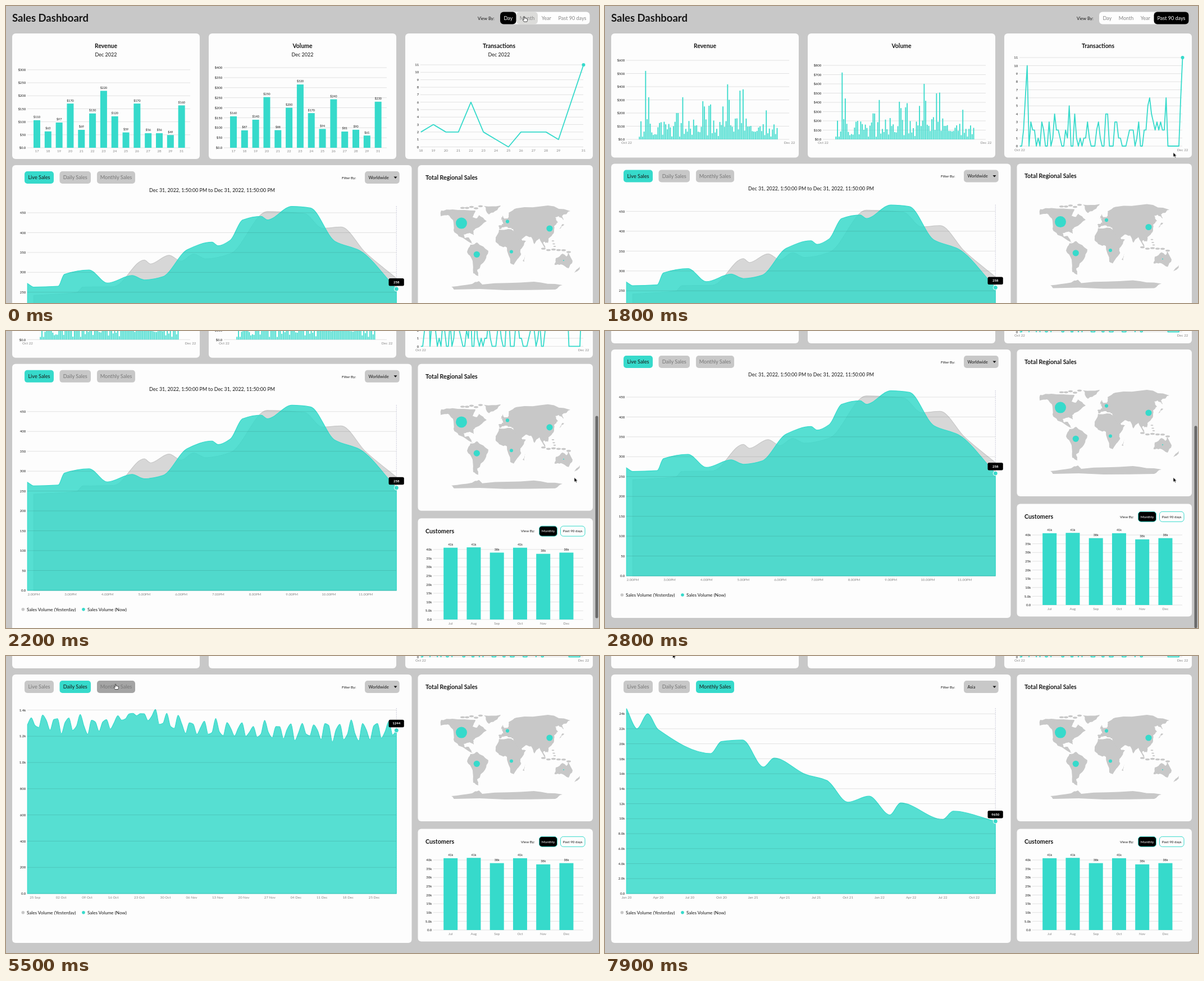
An HTML page that plays this animation: 1056x530 px, repeating every 8000 ms.

```html
<!DOCTYPE html>
<html lang="en">
<head>
<meta charset="utf-8">
<title>Sales Dashboard</title>
<style>
  html, body { margin: 0; width: 100%; height: 100%; overflow: hidden; background: #c8c8c8; }
  svg { display: block; width: 1056px; height: 530px; font-family: Lato, "Open Sans", sans-serif; }
  .menu text { font-family: Inter, Roboto, sans-serif; }
</style>
</head>
<body>
<svg id="stage" viewBox="0 0 1056 530"></svg>
<script>
const TEAL = '#36dacb', GRAY = '#c8c8c8', WHITE = '#fdfdfd', INK = '#161616', MUTED = '#858585';
const LOOP = 8000;
const stage = document.getElementById('stage');

// ---------- helpers (y of a text is its middle) ----------
const text = (x, y, str, size, { fill = INK, anchor = 'middle', bold = false, id = '' } = {}) =>
  `<text x="${x}" y="${y + size * 0.36}" font-size="${size}" fill="${fill}" text-anchor="${anchor}"` +
  `${bold ? ' font-weight="700"' : ''}${id && ` id="${id}"`}>${str}</text>`;
const rect = (x, y, w, h, r, fill, extra = '') =>
  `<rect x="${x}" y="${y}" width="${w}" height="${h}" rx="${r}" fill="${fill}" ${extra}/>`;
const dot = (x, y, r, fill = TEAL, extra = '') => `<circle cx="${x}" cy="${y}" r="${r}" fill="${fill}" ${extra}/>`;
const group = (id, body, extra = '') => `<g id="${id}" ${extra}>${body}</g>`;
const card = (x, y, w, h) => rect(x, y, w, h, 6, WHITE);
const range = (n, f) => Array.from({ length: n }, (_, i) => f(i));
const seeded = seed => () => (seed = seed * 16807 % 2147483647) / 2147483647;

// Linear interpolation through [position, ...values] keys
function at(keys, t) {
  const i = keys.findIndex(k => k[0] > t);
  if (i < 0) return keys[keys.length - 1].slice(1);
  if (!i) return keys[0].slice(1);
  const a = keys[i - 1], b = keys[i], p = (t - a[0]) / (b[0] - a[0]);
  return a.slice(1).map((v, n) => v + (b[n + 1] - v) * p);
}

// ---------- chart parts ----------
const short = v => !v ? '0.0' : v < 1000 ? String(+v.toPrecision(2))
  : v < 9950 ? (v / 1000).toFixed(1) + 'k' : Math.round(v / 1000) + 'k';
const money = v => '$' + short(v);

function grid(x1, x2, y0, scale, step, max, format = short) {
  let out = '';
  for (let v = 0; v <= max; v += step) {
    const y = y0 - v * scale;
    out += `<path d="M${x1} ${y}H${x2}" stroke="#001" stroke-opacity=".11"/>` +
      text(x1 - 2.7, y, format(v), 6, { anchor: 'end' });
  }
  return out;
}

const bars = (values, x, pitch, width, y0, scale, format) => values.map((v, i) => {
  const cx = x + i * pitch, top = y0 - v * scale;
  return rect(cx - width / 2, top, width, v * scale, 0, TEAL) +
    (format ? text(cx, top - 5.5, format(v), 5.3) : '');
}).join('');

const xLabels = (labels, x, pitch, y) =>
  labels.map((s, i) => text(x + i * pitch, y, s, 6.2, { fill: MUTED })).join('');

function line(points, y0, scale, step) {
  const pts = points.map(([i, v]) => [38.8 + i * step, y0 - v * scale]);
  return `<path d="M${pts.join('L')}" fill="none" stroke="${TEAL}" stroke-width="1.8" stroke-linejoin="round"/>` +
    dot(...pts[pts.length - 1], 3);
}
const indexed = values => values.map((v, i) => [i, v]);

// Monotone cubic through the points, flat at every peak and valley
function curve(points) {
  const n = points.length;
  const slope = range(n - 1, i => (points[i + 1][1] - points[i][1]) / (points[i + 1][0] - points[i][0]));
  const tangent = range(n, i => {
    const a = slope[i - 1], b = slope[i];
    if (a === undefined) return b;
    if (b === undefined) return a;
    return a * b > 0 ? 2 * a * b / (a + b) : 0;
  });
  let d = 'M' + points[0];
  for (let i = 1; i < n; i++) {
    const [x0, y0] = points[i - 1], [x1, y1] = points[i], h = (x1 - x0) / 3;
    d += `C${x0 + h} ${y0 + h * tangent[i - 1]} ${x1 - h} ${y1 - h * tangent[i]} ${x1} ${y1}`;
  }
  return d;
}

function area(points, x1, y0, scale, fill = TEAL, opacity = 0.83) {
  const step = (695.2 - x1) / points[points.length - 1][0];
  const d = curve(points.map(([i, v]) => [x1 + i * step, y0 - v * scale])) + `V${y0}H${x1}Z`;
  return `<path d="${d}" fill="${fill}" fill-opacity="${opacity}" stroke="${fill}" stroke-width="1.2"/>`;
}

// ---------- top row ----------
const titles = ['Revenue', 'Volume', 'Transactions'];
const topRow = (id, height, subtitle, charts) => group(id, titles.map((name, i) => {
  const x = 11 + i * 350, mid = x + 167;
  return card(x, 49, 334, height) + text(mid, 71.5, name, 10.4, { bold: true }) +
    (subtitle ? text(mid, 87, subtitle, 9) : '') +
    `<g transform="translate(${i * 350} 0)">${charts[i]}</g>`;
}).join(''));

const days = [...range(13, i => 17 + i), 31];
const dayBars = (values, scale, max) => grid(38, 328, 253, scale, 50, max, money) +
  bars(values, 55, 19.82, 12, 253, scale, money) + xLabels(days, 55, 19.82, 259);
const dayTrades = [2, 3, 2, 2, 6, 2, 1, 0, 2, 2, 2, 1, 11];
const dayView = topRow('day', 224, 'Dec 2022', [
  dayBars([106, 63, 97, 170, 69, 132, 219, 121, 59, 170, 56, 56, 49, 163], 0.464, 300),
  dayBars([157, 87, 140, 253, 88, 200, 316, 173, 94, 242, 81, 90, 61, 230], 0.3575, 400),
  grid(38, 328, 251.5, 13.32, 1, 11, String) +
    line(dayTrades.map((v, i) => [days[i + 1] - 18, v]), 251.5, 13.32, 22.28) +
    days.slice(1).map(d => text(38.8 + 22.28 * (d - 18), 258, d, 6.2, { fill: MUTED })).join('')
]);

// Month and year: same layout, other totals
function periodView(id, labels, pitch, width, totals, step, max) {
  const first = 183 - pitch * (labels.length - 1) / 2, gap = 289.7 / (labels.length - 1);
  const chart = (factor, top) => grid(38, 328, 238, 141 / top, step, top, money) +
    bars(totals.map(v => v * factor), first, pitch, width, 238, 141 / top, money) + xLabels(labels, first, pitch, 244);
  const trades = max / 50;
  return topRow(id, 221.5, '', [chart(1, max), chart(1.42, max * 1.6),
    grid(38, 328, 250, 158 / trades, trades / 10, trades, short) +
      line(indexed(totals.map(v => v / 60)), 250, 158 / trades, gap) + xLabels(labels, 38.8, gap, 256.5)]);
}
const months = 'Jan Feb Mar Apr May Jun Jul Aug Sep Oct Nov Dec'.split(' ');
const monthRandom = seeded(12);
const monthView = periodView('month', months, 22.4, 14, months.map(() => 2600 + 1800 * monthRandom()), 1000, 5000);
const yearView = periodView('year', ['2020', '2021', '2022'], 97, 58, [72000, 56000, 41000], 10000, 80000);

// 90 days: quiet seeded noise with a few outstanding days
const revenuePeaks = { 4: 520, 6: 320, 24: 200, 25: 200, 28: 320, 41: 290, 42: 250, 45: 255, 46: 265, 54: 250,
  57: 418, 58: 300, 65: 370, 67: 380, 82: 220 };
const tradePeaks = { 3: 6, 4: 10, 19: 4, 27: 5, 30: 4, 47: 4, 48: 4, 70: 5, 71: 6, 72: 4, 80: 6, 88: 6, 89: 11 };
const noise = seeded(90);
const revenue = range(90, i => revenuePeaks[i] || (20 + 140 * noise()) * (i > 69 ? 0.75 : 1));
const volume = revenue.map(v => v * (1.32 + 0.22 * noise()));
const trades = range(90, i => tradePeaks[i] || (i > 67 && i < 80 ? 2 : 0) + Math.floor((i > 67 ? 2 : 4) * noise() ** 2));
const span = ['Oct 22', 'Dec 22'];
const quarterBars = (values, scale, max) => grid(38, 328, 238, scale, 100, max, money) +
  bars(values, 61.3, 2.755, 1.8, 238, scale) + xLabels(span, 38.5, 290, 244);
const quarterView = topRow('quarter', 221.5, '', [
  quarterBars(revenue, 0.235, 600),
  quarterBars(volume, 0.165, 800),
  grid(38, 328, 250, 14.36, 1, 11, String) + line(indexed(trades), 250, 14.36, 3.255) + xLabels(span, 38.5, 290, 256.5)
]);

// ---------- header ----------
const segments = [['Day', 880, 28.5], ['Month', 909, 38], ['Year', 947.5, 29.5], ['Past 90 days', 977.5, 62]];
const tabs = [['Live Sales', 33, 52], ['Daily Sales', 95.5, 55.5], ['Monthly Sales', 162, 68]];
const buttons = (list, kind, y, r, size) => list.map(([name, x, w], i) =>
  rect(x, y, w, 22, r, 'none', `id="${kind}${i}"`) + text(x + w / 2, y + 11, name, size, { id: `${kind}Text${i}` })).join('');
const header = text(11, 21, 'Sales Dashboard', 18.5, { bold: true, anchor: 'start' }) +
  text(840, 22, 'View By:', 7.7, { anchor: 'start' }) +
  rect(880, 10.5, 159.5, 22, 6, WHITE) + buttons(segments, 'seg', 10.5, 6, 9);

// ---------- sales panel: curves given by their turning points ----------
const liveNow = [[0, 272], [1, 263], [5, 265], [6, 295], [10, 306], [13, 273], [17, 292], [19, 281], [22, 289],
  [26, 357], [30, 376], [31, 367], [33, 381], [35, 432], [38, 441], [39, 432], [43, 466], [46, 462], [50, 378],
  [54, 355], [60, 258]];
const liveBefore = [[0, 242], [7, 249], [8, 263], [13, 264], [18, 331], [19, 321], [22, 343], [24, 328], [26, 346],
  [28, 334], [32, 347], [38, 453], [44, 448], [47, 411], [50, 414], [54, 349], [59, 285]];
const world = [[0, 101.4], [1, 87.4], [2, 94], [3, 84.8], [5, 75.6], [8, 75.3], [9, 83.6], [12, 80.5], [13, 70],
  [14, 76.5], [17, 62], [18, 62], [20, 54.7], [24, 48.2], [25, 43.3], [26, 46.2], [29, 41.2], [35, 38.3]];
const asia = [[0, 24.7], [1, 22], [2, 24], [3, 21.9], [8, 18.7], [9, 20.3], [11, 20.5], [13, 16.9], [14, 18.1],
  [17, 15.9], [19, 15.1], [21, 12.2], [23, 13], [25, 10.5], [26, 12.1], [30, 9.9], [31, 11], [35, 9.65]];

// Daily sales swing every few days around a slowly moving level
const level = [[0, 1300], [8, 1310], [20, 1275], [28, 1375], [36, 1320], [44, 1265], [62, 1235], [76, 1245], [98, 1235]];
const swing = seeded(31);
const daily = range(99, d => {
  const calm = Math.min(1, Math.abs(d - 28) / 6);
  return [d, at(level, d)[0] + calm * (35 + 60 * swing()) * Math.cos((d - 1) * 2 * Math.PI / 3.27)];
});
daily[98][1] = 1244;

const legend = y => dot(30.3, y, 2.8, GRAY) + text(37, y, 'Sales Volume (Yesterday)', 8.1, { anchor: 'start' }) +
  dot(138, y, 2.8) + text(145, y, 'Sales Volume (Now)', 8.1, { anchor: 'start' });
const guide = (x, top, bottom) =>
  `<path d="M${x} ${top}V${bottom}" stroke="#bcbcd0" stroke-width=".8" stroke-dasharray="2 1.4"/>`;
const marker = (y, label) => dot(695.3, y, 4, TEAL, `stroke="${WHITE}" stroke-width="1"`) +
  rect(681.5, y - 19, 27.3, 13.5, 2.5, '#000') + text(695.2, y - 12.4, label, 6.1, { fill: '#fff', bold: true });

const quarters = range(12, i => `${months[i % 4 * 3]} ${20 + Math.floor(i / 4)}`);
const weeks = range(14, i => {
  const d = new Date(2022, 8, 25 + 7 * i);
  return `${String(d.getDate()).padStart(2, '0')} ${months[d.getMonth()]}`;
});

const history = (id, points, scale, unit, step, max, guideX, labels) =>
  group(id, guide(guideX, 93, 424) + area(points, 38.3, 424, scale * unit) +
    grid(38, 695, 424, scale, step, max) + labels + legend(457.7));
const salesCharts =
  group('live', text(367, 77.5, 'Dec 31, 2022, 1:50:00 PM to Dec 31, 2022, 11:50:00 PM', 8.85) +
    guide(695.3, 106, 437) + area(liveBefore, 49.3, 437, 0.709, GRAY, 0.7) + area(liveNow, 38.3, 437, 0.709) +
    grid(38, 695, 437, 0.709, 50, 450) +
    xLabels(range(10, i => `${i + 2}.00PM`), 49.3, 65.7, 443.5) + marker(254, '258') + legend(471)) +
  history('daily', daily, 0.234, 1, 200, 1400, 695.3, xLabels(weeks, 51.7, 46.46, 430.5) + marker(132.7, '1244')) +
  history('world', world, 0.003255, 1000, 10000, 100000, 713.7, xLabels(quarters, 38.5, 56.3, 430.5)) +
  history('asia', asia, 0.01337, 1000, 2000, 24000, 695.3, xLabels(quarters, 38.5, 56.3, 430.5) + marker(295, '9650'));

const salesPanel = card(11, 33, 711.5, 479) + buttons(tabs, 'tab', 44, 5, 9.2) +
  text(598, 55.5, 'Filter By:', 6.4, { anchor: 'start' }) +
  rect(639, 44, 61.7, 22, 5, GRAY, 'id="select"') +
  text(645.5, 55, 'Worldwide', 7.5, { anchor: 'start', id: 'choice' }) +
  '<path d="M690.5 53.5h6l-3 3.4z" fill="#111"/>' + salesCharts;

const regions = ['Worldwide', 'North America', 'South America', 'Europe', 'Africa', 'Asia', 'Australia'];
const menu = group('menu',
  rect(641, 46, 72, 90.5, 4, '#dfe4e7', 'stroke="#aaa" stroke-width=".7" style="filter:drop-shadow(0 2px 3px #0005)"') +
  rect(644, 0, 65.5, 12.3, 2.5, '#3f8cf8', 'id="glow"') +
  '<path d="M646.5 55.5l1.7 2 3-4.3" fill="none" stroke="#fff" id="tick"/>' +
  regions.map((r, i) => text(654.7, 55 + i * 12.13, r, 6.9, { anchor: 'start', id: 'region' + i })).join(''), 'class="menu"');

// ---------- map: rough outlines with seeded ragged coasts ----------
const outlines = {
  northAmerica: '775,114 795,112 836,114 831,126 838,128 842,122 856,133 837,146 832,151 833,158 826,154 815,157 817,163 824,162 832,174 806,160 797,149 796,131 787,122 774,124',
  greenland: '851,106 881,105 875,113 860,121',
  southAmerica: '827,175 839,171 859,186 853,203 839,220 841,231 832,226 831,204 821,188',
  africa: '878,148 894,147 912,153 919,167 926,168 916,184 917,193 904,211 898,208 892,180 880,177 872,170 872,162',
  eurasia: '877,141 886,138 883,132 895,126 895,118 909,110 965,105 1005,115 990,124 993,131 984,124 978,126 983,135 976,142 975,155 966,164 965,172 957,170 960,182 950,164 941,174 935,161 926,159 914,169 905,152 903,147 896,145 889,143 879,147',
  australia: '977,211 979,199 991,191 998,196 1002,190 1009,204 1002,217 988,210',
  antarctica: '793,250 830,245 842,240 848,246 940,241 991,247 978,255 798,255',
  britain: '881,131 884,123 888,130',
  japan: '985,147 991,138 994,139',
  madagascar: '920,204 925,193 923,205',
  newZealand: '1012,225 1022,214 1021,219'
};
const coast = seeded(7);
function ragged(outline) {
  const pts = outline.split(' ').map(p => p.split(',').map(Number));
  return pts.flatMap(([x, y], i) => {
    const [nx, ny] = pts[(i + 1) % pts.length];
    const reach = Math.min(1, Math.hypot(nx - x, ny - y) / 12);
    return range(4, k => [x + (nx - x) * k / 4, y + (ny - y) * k / 4]
      .map(v => (v + (k ? reach * 2.4 * (coast() - 0.5) : 0)).toFixed(1)));
  }).join(' ');
}
const islands = (n, x, y, dx, dy, r) => range(n, i =>
  `<ellipse cx="${x + i * dx}" cy="${y + i * dy + 4 * (coast() - 0.5)}" rx="${r}" ry="${r / 2.2}" fill="${GRAY}"/>`).join('');
const regionDots = [[811, 136.6, 10], [838.3, 192.3, 5.6], [893, 133.6, 3.1], [900, 187.4, 3], [968, 146, 5.6], [993, 203, 1]];
const mapPanel = card(733.5, 33, 311.5, 262) + text(747, 55, 'Total Regional Sales', 10.6, { bold: true, anchor: 'start' }) +
  Object.values(outlines).map(o => `<polygon points="${ragged(o)}" fill="${GRAY}"/>`).join('') +
  islands(5, 813, 111, 8, -0.8, 4) + islands(6, 957, 183, 9, 0.8, 4) + islands(3, 974, 169, 1.5, 4, 2.4) +
  regionDots.map(d => dot(...d)).join('');

// ---------- customers ----------
const border = `stroke="${TEAL}" stroke-width="1"`;
const customers = card(733.5, 308.5, 311.5, 201) + text(747, 331.5, 'Customers', 10.7, { bold: true, anchor: 'start' }) +
  text(917, 331.3, 'View By:', 6.4, { anchor: 'start' }) +
  rect(949.5, 322.3, 32, 18, 5, '#000', border) + text(965.5, 331.3, 'Monthly', 6.3, { fill: '#fff' }) +
  rect(987.5, 322.3, 43.5, 18, 5, WHITE, border) + text(1009.2, 331.3, 'Past 90 days', 6.3) +
  grid(761, 1028, 489, 0.003125, 5000, 40000) +
  bars([41000, 41200, 38200, 41000, 37500, 38200], 791.7, 41.25, 25, 489, 0.003125, short) +
  xLabels(months.slice(6), 791.7, 41.25, 495.5);

const pointers =
  '<path id="arrow" d="M0 0V8L1.9 6.3L3.1 9L4.5 8.4L3.3 5.8H5.8Z" fill="#000" stroke="#fff" stroke-width=".6"/>' +
  '<path id="hand" d="M-.8 .6Q0-.4 .8.6V3.4Q2.2 2.8 2.6 3.8Q4 3.4 4.3 4.5Q5.6 4.4 5.6 5.6V7.2L4.6 9.6H-.6L-3 6.2Q-2.8 4.8-.8 6.2Z" fill="#fff" stroke="#222" stroke-width=".8"/>';

stage.innerHTML = group('page', header + dayView + monthView + yearView + quarterView +
  group('row', salesPanel + mapPanel + customers + menu)) +
  rect(1049.5, 0, 5, 361, 2.5, '#6a6a6a', 'id="bar"') + group('cursor', pointers);

// ---------- timeline ----------
const $ = id => document.getElementById(id);
const show = (id, on) => { $(id).style.display = on ? '' : 'none'; };
const paint = (id, fill) => $(id).setAttribute('fill', fill);
const move = (id, x, y) => $(id).setAttribute('transform', `translate(${x} ${y})`);
const latest = (marks, t) => marks.filter(time => time <= t).length;
const smooth = p => p * p * (3 - 2 * p);

const path = [[700, 923, 18.5], [900, 962, 19], [1000, 962, 19], [1200, 1008, 19], [1300, 1008, 19],
  [1600, 1012, 261.5], [3400, 1012, 261.5], [4000, 124, 17.5], [4100, 124, 17.5], [4400, 122, 50], [4800, 122, 50],
  [5400, 195, 50], [5800, 195, 50], [6300, 670, 51], [6800, 684.5, 56.5], [7200, 676, 114],
  [7400, 676, 114], [7900, 120.5, -4]];
const views = ['day', 'month', 'year', 'quarter'], viewClicks = [100, 900, 1300];
const charts = ['live', 'daily', 'world', 'asia'], chartClicks = [4500, 5700, 7300];

function render(t) {
  const [x, y] = at(path, t);
  const scroll = 248.5 * smooth(Math.min(1, Math.max(0, (t - 1800) / 500)));
  const view = latest(viewClicks, t), chart = latest(chartClicks, t);
  const open = t >= 6500 && t < 7300;
  let hand = false;
  const over = (top, left, w) => {
    const hit = y >= top - 1 && y < top + 22 && x >= left && x < left + w;
    hand = hand || hit;
    return hit;
  };

  views.forEach((id, i) => show(id, i === view));
  charts.forEach((id, i) => show(id, i === chart));
  move('page', 0, -scroll);
  move('row', 0, view ? 248.5 : 251);

  segments.forEach(([, left, w], i) => {
    const hover = !scroll && over(10.5, left, w);
    paint('seg' + i, i === view ? '#000' : hover ? '#dcdcda' : 'none');
    paint('segText' + i, i === view ? '#fff' : MUTED);
  });
  tabs.forEach(([, left, w], i) => {
    const active = i === Math.min(chart, 2), hover = scroll > 240 && over(44, left, w);
    paint('tab' + i, active ? TEAL : hover ? '#a4a4a4' : GRAY);
    paint('tabText' + i, active ? INK : '#777');
  });

  show('menu', open);
  paint('select', open ? '#a4a4a4' : GRAY);
  $('choice').textContent = chart === 3 ? 'Asia' : 'Worldwide';
  const pick = Math.max(0, Math.min(6, Math.round((y - 55) / 12.13)));
  $('glow').setAttribute('y', 49 + pick * 12.13);
  $('tick').setAttribute('stroke', pick ? INK : '#fff');
  regions.forEach((_, i) => paint('region' + i, i === pick ? '#fff' : INK));

  show('bar', t > 1800 && t < 3200);
  move('bar', 0, scroll * 530 / 778.5);
  move('cursor', x, y);
  show('hand', hand);
  show('arrow', !hand);
}

function tick() {
  render(Math.floor(performance.now() % LOOP / 100) * 100);
  requestAnimationFrame(tick);
}
tick();
</script>
</body>
</html>
```
